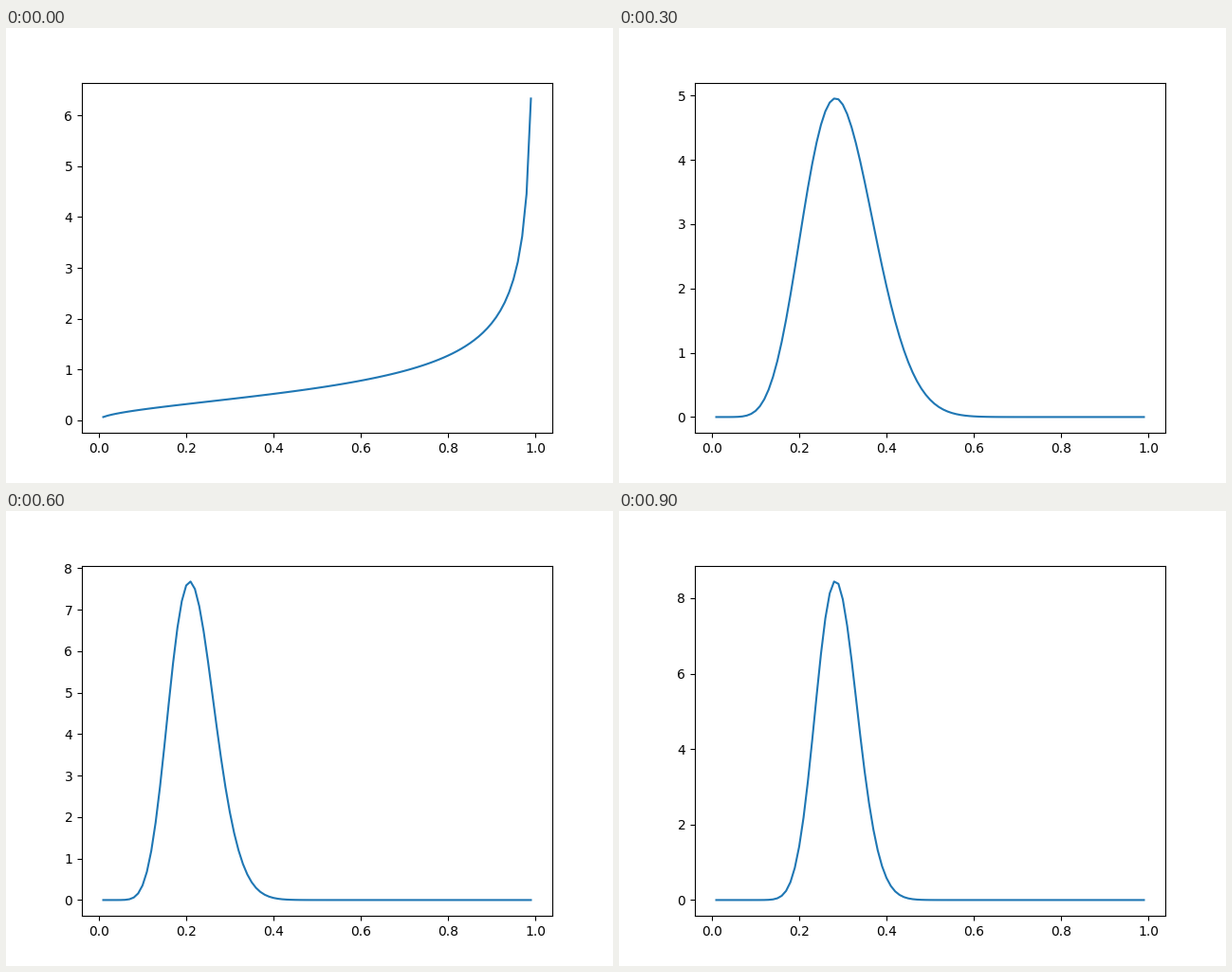
Recreate the animation shown at these times as a matplotlib script. Size 640 by 480 pixels, loop 1 s.

```python
import math

import matplotlib.pyplot as plt
import numpy as np
from matplotlib.animation import FuncAnimation

PRIOR_A, PRIOR_B = 1.5, 0.5
TRIALS_PER_STEP = 10
SUCCESSES = np.cumsum([0, 3, 4, 1, 2, 1, 1, 4, 4, 5])

x = np.arange(1, 100) / 100


def beta_pdf(x, a, b):
    log_norm = math.lgamma(a + b) - math.lgamma(a) - math.lgamma(b)
    return np.exp(log_norm + (a - 1) * np.log(x) + (b - 1) * np.log(1 - x))


def posterior(step):
    hits = int(SUCCESSES[step])
    misses = step * TRIALS_PER_STEP - hits
    return beta_pdf(x, PRIOR_A + hits, PRIOR_B + misses)


fig, ax = plt.subplots(figsize=(6.4, 4.8), dpi=100)
line, = ax.plot(x, posterior(0))


def update(step):
    line.set_ydata(posterior(step))
    ax.relim()
    ax.autoscale_view()
    return line,


anim = FuncAnimation(fig, update, frames=len(SUCCESSES), interval=100,
                     repeat=True, repeat_delay=0)
plt.show()
```
